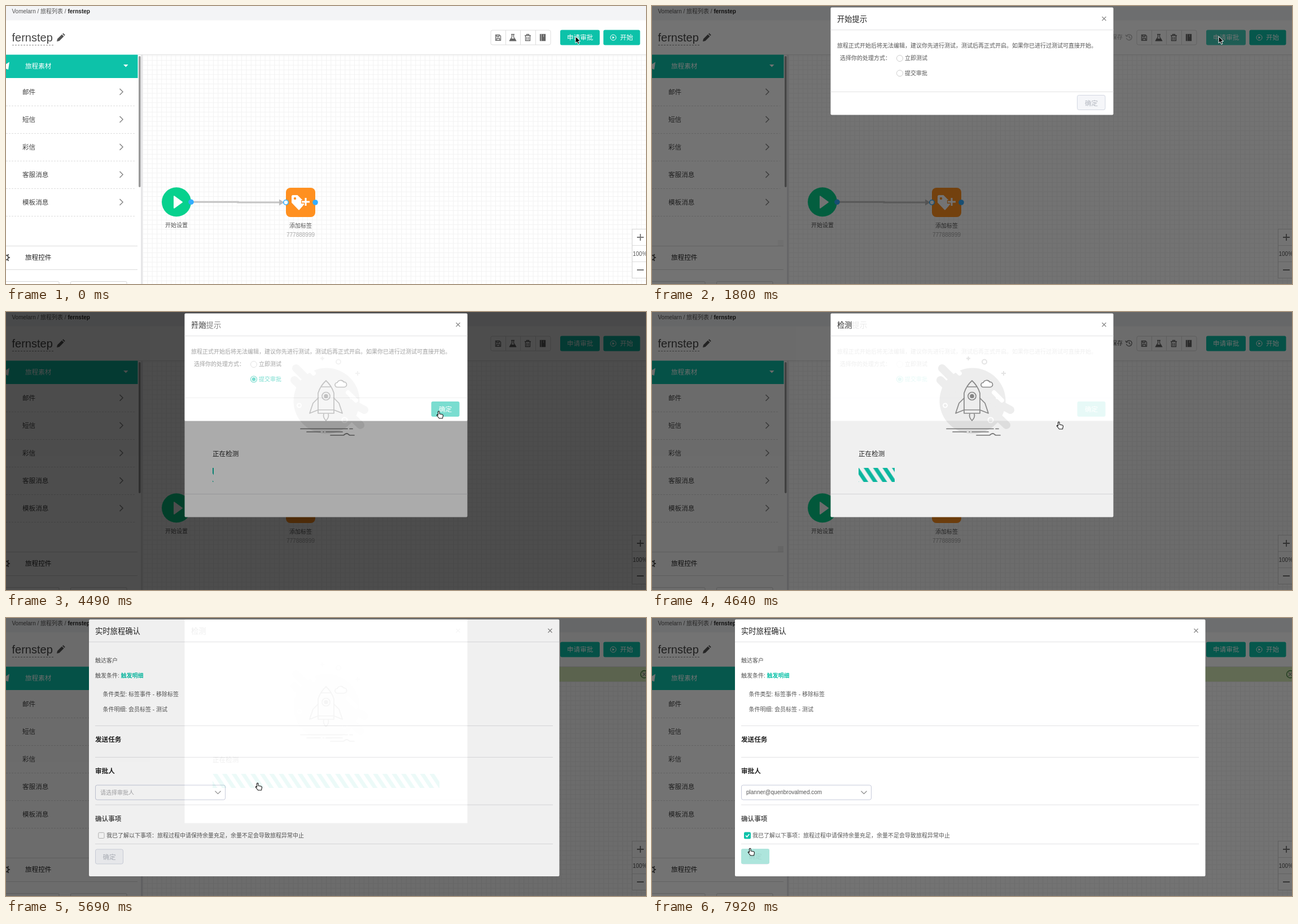
These frames come from a looping animation (1134 by 494 pixels, 8000 ms). An HTML page:

```html
<!DOCTYPE html>
<html lang="zh-CN">
<head>
<meta charset="utf-8">
<title>旅程</title>
<style>
html, body { margin: 0; width: 100%; height: 100%; overflow: hidden; background: #fff; }
svg { display: block; width: 100%; height: 100%; }
text { font: 10px "Liberation Sans", "Noto Sans CJK SC", "Noto Sans CJK", sans-serif; fill: #555; white-space: pre; }
.m { font-size: 11.6px; fill: #444; }
.b { font-weight: bold; fill: #222; }
.t { font-size: 13.3px; fill: #222; }
.w { font-size: 11.6px; font-weight: 500; fill: #fff; }
.dim { font-size: 11.6px; fill: #b4b8c0; }
.teal { fill: #0dc2a9; }
text.teal { font-weight: 500; }
.card { fill: #fff; }
.rule { stroke: #e2e2e4; fill: none; }
.off { fill: #f5f6f9; stroke: #d3d7e2; }
.line { fill: none; stroke: #7c7c7c; stroke-width: 1.7; stroke-linejoin: round; stroke-linecap: round; }
.x { stroke: #888; stroke-width: 1.2; fill: none; }

.a { animation: 8s step-end -10ms infinite; }
#veil { animation-name: veil; }
#apply { animation-name: apply; }
#saved { animation-name: saved; }
#ask { animation-name: ask; }
#askVeil { animation-name: askVeil; }
#picked { animation-name: picked; }
#check { animation-name: check; }
#checkVeil { animation-name: checkVeil; }
#bar { animation-name: bar; }
#slide { animation-name: slide; }
#confirm, #alert { animation-name: confirm; }
#list { animation-name: list; }
#hint { animation-name: hint; }
#mail { animation-name: mail; }
#agreed { animation-name: agreed; }
#ready { animation-name: ready; }
#pointer { animation-name: pointer; }
#arrow { animation-name: arrow; }
#hand { animation-name: hand; }

@keyframes veil { 0% { opacity: 0 } 22.5% { opacity: .55 } }
@keyframes apply { 0% { opacity: 1 } 18.75% { opacity: .78 } 24.375% { opacity: 1 } }
@keyframes saved { 0% { opacity: 0 } 22.5% { opacity: .5 } 24.375% { opacity: 1 } 56.125% { opacity: 0 } 58% { opacity: 1 } }
@keyframes ask { 0% { opacity: 0 } 22.5% { opacity: 1 } 56.125% { opacity: .55 } 58% { opacity: .1 } 59.875% { opacity: 0 } }
@keyframes askVeil { 0% { opacity: 0 } 56.125% { opacity: .33 } 58% { opacity: .06 } 59.875% { opacity: 0 } }
@keyframes picked { 0% { opacity: 0 } 41.125% { opacity: 1 } }
@keyframes check { 0% { opacity: 0 } 56.125% { opacity: 1 } 69.25% { opacity: .55 } 71.125% { opacity: .08 } 73% { opacity: 0 } }
@keyframes checkVeil { 0% { opacity: 0 } 69.25% { opacity: .33 } 71.125% { opacity: .06 } 73% { opacity: 0 } }
@keyframes bar {
  0% { width: 0 }
  56.125% { width: 2px; animation-timing-function: steps(6) }
  67.375% { width: 374px }
  69.25% { width: 402px }
}
@keyframes slide {
  0% { transform: none }
  56.125% { transform: translateX(0); animation-timing-function: steps(8) }
  71.125% { transform: translateX(-10px) }
}
@keyframes confirm { 0% { opacity: 0 } 69.25% { opacity: 1 } }
@keyframes list { 0% { opacity: 0 } 84% { opacity: .5 } 85.875% { opacity: 1 } 89.625% { opacity: .4 } 91.5% { opacity: 0 } }
@keyframes hint { 0% { opacity: 1 } 89.625% { opacity: 0 } }
@keyframes mail { 0% { opacity: 0 } 89.625% { opacity: 1 } }
@keyframes agreed { 0% { opacity: 0 } 97.125% { opacity: 1 } }
@keyframes ready { 0% { opacity: 0 } 99% { opacity: 1 } }
@keyframes arrow { 0% { opacity: 1 } 39.25% { opacity: 0 } 44.875% { opacity: 1 } 50.5% { opacity: 0 } }
@keyframes hand { 0% { opacity: 0 } 39.25% { opacity: 1 } 44.875% { opacity: 0 } 50.5% { opacity: 1 } }
@keyframes pointer {
  0% { transform: translate(1009px, 54px) }
  5.625% { transform: translate(1008px, 54px) }
  9.375% { transform: translate(1006px, 54px) }
  11.25% { transform: translate(1004px, 54px) }
  28% { transform: translate(985px, 57px) }
  29.875% { transform: translate(850px, 74px) }
  31.75% { transform: translate(650px, 98px) }
  33.625% { transform: translate(480px, 115px) }
  35.5% { transform: translate(386px, 122px) }
  37.375% { transform: translate(420px, 125px) }
  39.25% { transform: translate(436px, 125px) }
  44.875% { transform: translate(470px, 135px) }
  46.75% { transform: translate(560px, 155px) }
  48.625% { transform: translate(680px, 178px) }
  50.5% { transform: translate(758px, 185px) }
  52.375% { transform: translate(766px, 176px) }
  58% { transform: translate(720px, 195px) }
  59.875% { transform: translate(640px, 225px) }
  61.75% { transform: translate(560px, 255px) }
  63.625% { transform: translate(490px, 280px) }
  65.5% { transform: translate(452px, 291px) }
  67.375% { transform: translate(445px, 293px) }
  73% { transform: translate(430px, 297px) }
  74.875% { transform: translate(390px, 303px) }
  76.75% { transform: translate(330px, 308px) }
  78.625% { transform: translate(280px, 311px) }
  80.375% { transform: translate(255px, 312px) }
  82.25% { transform: translate(250px, 312px) }
  85.875% { transform: translate(250px, 318px) }
  87.75% { transform: translate(245px, 336px) }
  89.625% { transform: translate(240px, 340px) }
  91.5% { transform: translate(220px, 360px) }
  93.375% { transform: translate(185px, 380px) }
  95.25% { transform: translate(168px, 386px) }
  99% { transform: translate(173px, 409px) }
}
</style>
</head>
<body>
<svg viewBox="0 0 1134 494">
<defs>
  <pattern id="grid" x="242" y="88" width="8.333" height="8.333" patternUnits="userSpaceOnUse">
    <path d="M.5 0V8.333M0 .5H8.333" stroke="#f2f2f2"/>
  </pattern>
  <pattern id="stripes" x="366" y="277" width="16.7" height="25" patternUnits="userSpaceOnUse">
    <path class="teal" d="M-6.5 0h8.35l16.7 25h-8.35zM10.2 0h8.35l16.7 25h-8.35zM-23.2 0h8.35l16.7 25h-8.35z"/>
  </pattern>
  <clipPath id="done"><rect id="bar" class="a" x="366" y="277" height="25"/></clipPath>
  <path id="next" d="M-2.5-5.5 3 0l-5.5 5.5" fill="none" stroke="#888" stroke-width="1.5"/>
  <path id="close" class="x" d="M-3.5-3.5l7 7m0-7l-7 7"/>
</defs>

<!-- page -->
<rect width="1134" height="494" fill="#fff"/>
<rect width="1134" height="25.5" fill="#f3f4f6"/>
<text x="10.5" y="12.6" fill="#777">Vomelarn / 旅程列表 / <tspan class="b">fernstep</tspan></text>
<text x="10.5" y="63" style="font-size:20px;fill:#444">fernstep</text>
<path d="M11 69.5H84" stroke="#888" stroke-dasharray="3 2"/>
<path d="M90 63l1-4.5 8-8 3.5 3.5-8 8zM100 49.5l1.5-1.2 3.2 3.2-1.2 1.5z" fill="#555"/>

<rect x="241" y="87" width="893" height="407" fill="url(#grid)"/>
<path d="M234 86.5H1134" stroke="#e0e0e0"/>
<path d="M240.5 87V494" stroke="#e6e6e8" stroke-width="3"/>

<!-- toolbar -->
<rect x="859" y="43" width="106" height="26" rx="3" fill="#fff" stroke="#ddd"/>
<path d="M885.5 43v26M911.5 43v26M938.5 43v26" stroke="#ddd"/>
<g fill="none" stroke="#666" stroke-width="1.3">
  <path d="M867.5 51.5h7l2 2v7.5h-9zM869.5 51.5v3h4v-3M869.5 61v-3.5h5V61"/>
  <path d="M895 50.5h6M896.5 50.5v4.5l-4 6.5h11l-4-6.5v-4.5"/>
  <path d="M894.5 58.5h7l1.5 3h-10z" fill="#666"/>
  <path d="M919 52.5h11M922.5 52v-1.5h4V52"/>
  <path d="M920.5 53v8.5h8V53M923 55v5M926 55v5"/>
  <path d="M946.5 50.5h9v11h-9z" fill="#666"/>
  <path d="M948.5 50v12M952.5 51v4" stroke="#ddd" stroke-width=".7"/>
</g>
<g id="apply" class="a">
  <rect class="teal" x="982" y="42.5" width="70" height="27" rx="3"/>
  <text class="w" x="994" y="60.3">申请审批</text>
</g>
<rect class="teal" x="1058.5" y="42.5" width="65" height="27" rx="3"/>
<circle cx="1076" cy="56" r="5" fill="none" stroke="#fff"/>
<path d="M1074.5 53.7l3.8 2.3-3.8 2.3z" fill="#fff"/>
<text class="w" x="1088" y="60.3">开始</text>

<!-- sidebar -->
<rect y="87" width="233" height="407" fill="#fff"/>
<rect class="teal" y="86.5" width="233.5" height="41.5"/>
<path d="M-8 108L6 99.5 4 113l-5-2z" fill="#fff"/>
<text class="w" x="34" y="111.4">旅程素材</text>
<path d="M208 104h8.5l-4.2 4.5z" fill="#fff"/>
<text class="m" x="29" y="156.6">邮件</text><use href="#next" x="204" y="152.5"/>
<text class="m" x="29" y="205.7">短信</text><use href="#next" x="204" y="201.5"/>
<text class="m" x="29" y="254.8">彩信</text><use href="#next" x="204" y="250.5"/>
<text class="m" x="29" y="303.9">客服消息</text><use href="#next" x="204" y="299.5"/>
<text class="m" x="29" y="353">模板消息</text><use href="#next" x="204" y="348.5"/>
<path d="M0 177.5H228M0 226.5H228M0 275.5H228M0 324.5H228M0 373.5H228" stroke="#ddd" stroke-dasharray="3 2"/>
<path d="M0 426.5H233M0 468.5H233" stroke="#dcdcdc"/>
<circle cx="0" cy="447" r="4" fill="none" stroke="#555" stroke-width="2"/>
<path d="M4 447h3M2.5 443.5l2.2-2.2M2.5 450.5l2.2 2.2" stroke="#555" stroke-width="2"/>
<text class="w" x="34" y="451.4" style="fill:#222">旅程控件</text>
<path d="M0 489.5H92q2 0 2 2V494M114.5 494v-2.5q0-2 2-2H212q2 0 2 2V494" fill="none" stroke="#d5d5d5"/>
<rect x="235" y="89" width="3.5" height="233" rx="1.7" fill="#999"/>

<!-- flow -->
<path d="M332 348.3H411L411 349H486" fill="none" stroke="#c4c4c4" stroke-width="3"/>
<path d="M484 343.5l9 5.5-9 5.5z" fill="#bbb"/>
<circle cx="302" cy="348.3" r="26" fill="#07d18d"/>
<path d="M298 338.2v20.5l14-10.2z" fill="#fff" stroke="#fff" stroke-width="2" stroke-linejoin="round"/>
<rect x="496" y="323" width="52" height="52" rx="8" fill="#ff9020"/>
<path d="M508 337h8l13 13-10 11.5-12-12.5v-11z" fill="#fff" stroke="#fff" stroke-width="2" stroke-linejoin="round"/>
<circle cx="512" cy="342" r="2.2" fill="#ff9020"/>
<path d="M531 340v16M523 348h16" stroke="#ff9020" stroke-width="6"/>
<path d="M531 341v14M524 348h14" stroke="#fff" stroke-width="3"/>
<circle cx="328" cy="348.3" r="4.8" fill="#33adff"/>
<circle cx="548" cy="349" r="4.8" fill="#33adff"/>
<circle cx="496" cy="349" r="4.2" fill="#fff" stroke="#33adff" stroke-width="1.6"/>
<g text-anchor="middle">
  <text x="302" y="392.6">开始设置</text>
  <text x="522" y="393.6">添加标签</text>
  <text x="522" y="410" style="fill:#aaa">777888999</text>
</g>
<rect x="1109.5" y="396.5" width="30" height="87" fill="#fff" stroke="#d5d5d5"/>
<path d="M1110 425.5h24M1110 454.5h24" stroke="#ddd"/>
<path d="M1118 411h12M1124 405v12M1118 469h12" stroke="#777" stroke-width="1.8"/>
<text x="1110.5" y="443.5">100%</text>

<g id="saved" class="a">
  <path d="M223.5 129h9.5v297h-9.5z" fill="#fff"/>
  <path d="M223 416h10v10h-10z" fill="#f0f0f0"/>
  <text x="814" y="59.3" font-style="italic">保存</text>
  <path d="M841 53a5 5 0 1 1-.5 4M839 51l1.5 3 3-.5M845.5 52.5v3.5l2.5 1" fill="none" stroke="#666" stroke-width="1.2"/>
</g>
<g id="alert" class="a">
  <rect x="241" y="87" width="893" height="26" fill="#d9ecb8"/>
  <circle cx="1131" cy="100" r="6.5" fill="none" stroke="#3c7a3a" stroke-width="1.3"/>
  <use href="#close" x="1131" y="100"/>
</g>
<rect id="veil" class="a" width="1134" height="494"/>

<!-- confirm dialog -->
<g id="confirm" class="a">
  <rect class="card" x="147" y="2.5" width="833.5" height="456.5" rx="2"/>
  <text class="t" x="158" y="27.5">实时旅程确认</text>
  <use href="#close" x="964" y="22.5"/>
  <path class="rule" d="M147 42.5H980M158 191.5H969M158 247.5H969M158 332H969M158 401.5H969"/>
  <text x="158" y="79.3">触达客户</text>
  <text x="158" y="106">触发条件: <tspan class="teal" style="font-weight:bold">触发明细</tspan></text>
  <text x="171.5" y="139.2">条件类型: 标签事件 - 移除标签</text>
  <text x="171.5" y="166">条件明细: 会员标签 - 测试</text>
  <text class="m b" x="158" y="219.8">发送任务</text>
  <text class="m b" x="158" y="276.4">审批人</text>
  <rect x="158.5" y="297" width="230" height="26" rx="3" fill="#fff" stroke="#c6cada"/>
  <text id="hint" class="a" x="167" y="313.8" style="fill:#a5a5a8">请选择审批人</text>
  <text id="mail" class="a" x="167" y="313.3">planner@quenbrovalmed.com</text>
  <path class="x" d="M370.5 307.5l5 5 5-5"/>
  <text class="m b" x="158" y="361" style="fill:#555">确认事项</text>
  <rect x="163.8" y="381.3" width="10.2" height="10.2" rx="1.5" fill="#fff" stroke="#bbb"/>
  <g id="agreed" class="a">
    <rect class="teal" x="163" y="380.5" width="12" height="12" rx="2"/>
    <path d="M166 386.5l2.3 2.5 4-5" fill="none" stroke="#fff" stroke-width="1.6"/>
  </g>
  <text x="178" y="389.8">我已了解以下事项：旅程过程中请保持余量充足，余量不足会导致旅程异常中止</text>
  <rect class="off" x="158.5" y="411" width="49" height="26" rx="3"/>
  <text class="dim" x="171.5" y="428.5">确定</text>
  <g id="ready" class="a">
    <rect x="158" y="410" width="50" height="27" rx="3" fill="#ade5dc"/>
    <text class="dim" x="171.5" y="428" style="fill:#a0d6ce">确定</text>
  </g>
  <g id="list" class="a">
    <rect x="158.5" y="328" width="230" height="36" rx="3" fill="#fff" stroke="#dfe2ea"/>
    <rect x="159" y="333" width="229" height="26" fill="#f5f7fa"/>
    <text x="167" y="349.5">planner@quenbrovalmed.com</text>
  </g>
</g>

<!-- check dialog -->
<path id="checkVeil" class="a" fill-rule="evenodd" d="M0 0H1134V494H0zM316.5 2.5h501v362h-501z"/>
<g id="check" class="a">
  <rect class="card" x="316.5" y="2.5" width="501" height="362" rx="2"/>
  <text class="t" x="328" y="27.5">检测</text>
  <use href="#close" x="801" y="22.5"/>
  <path class="rule" d="M316.5 42.5h501M316.5 323.5h501"/>
  <circle cx="568" cy="158" r="58.5" fill="#ebebeb"/>
  <path d="M514 100l38 38M511 121l20 20M590 150l45 24M596 170l32 31" stroke="#ebebeb" stroke-width="14" stroke-linecap="round"/>
  <path d="M529 93l16 16M606 143l14 14" stroke="#fff" stroke-width="8" stroke-linecap="round"/>
  <g fill="none" stroke="#fff" stroke-width="2">
    <circle cx="519.5" cy="166" r="3.5"/><circle cx="600" cy="192" r="4.5"/><circle cx="612" cy="152" r="2"/>
  </g>
  <circle cx="589" cy="88.5" r="4" fill="none" stroke="#e2e2e2" stroke-width="2"/>
  <path d="M560.5 79v7M557 82.5h7M623 105v8M619 109h8" stroke="#e2e2e2" stroke-width="2"/>
  <g class="line">
    <path d="M567 122q-10 9-14 22v36h28v-36q-4-13-14-22zM559 133h16M553 174h28"/>
    <circle cx="567" cy="149.5" r="7"/><circle cx="567" cy="149.5" r="3" fill="#777"/>
    <path d="M553 153l-9 9-6 18 15-6M581 153l9 9 6 18-15-6M563 181q-2 6 4 12 6-6 4-12"/>
    <path d="M587 133.5a4 4 0 0 1 0-8 6.5 6.5 0 0 1 11.5-1 4.500 4.500 0 0 1 1 9z" fill="#fff"/>
    <path d="M522 207.5h83M609 207.5h5M533 213h24M562 213h1M567 213h29M575 219h22q2 0 3-1.5 4-3 7 0 1 1.5 3 1.5h7"/>
  </g>
  <text class="w" x="366" y="256.3" style="fill:#222">正在检测</text>
  <g clip-path="url(#done)">
    <rect id="slide" class="a" x="366" y="277" width="420" height="25" fill="url(#stripes)"/>
  </g>
</g>

<!-- start dialog -->
<path id="askVeil" class="a" fill-rule="evenodd" d="M0 0H1134V494H0zM316.5 2.5h501v191h-501z"/>
<g id="ask" class="a">
  <rect class="card" x="316.5" y="2.5" width="501" height="191" rx="2"/>
  <text class="t" x="328" y="27.5">开始提示</text>
  <use href="#close" x="801" y="22.5"/>
  <path class="rule" d="M316.5 42.5h501M316.5 152.5h501"/>
  <text x="328" y="74.3">旅程正式开始后将无法编辑，建议你先进行测试，测试后再正式开启。如果你已进行过测试可直接开始。</text>
  <text x="333" y="96.3">选择你的处理方式：</text>
  <g fill="#fff" stroke="#ccc"><circle cx="439" cy="93" r="5.5"/><circle cx="439" cy="119.5" r="5.5"/></g>
  <text x="448" y="96.3">立即测试</text>
  <text x="448" y="123">提交审批</text>
  <rect class="off" x="753.5" y="158.5" width="49.5" height="26" rx="3"/>
  <text class="dim" x="767" y="176.5">确定</text>
  <g id="picked" class="a">
    <path d="M447 112h44v15h-44z" fill="#fff"/>
    <circle cx="439" cy="119.5" r="5.5" fill="#fff" stroke="#0dc2a9" stroke-width="1.2"/>
    <circle class="teal" cx="439" cy="119.5" r="3.2"/>
    <text class="teal" x="448" y="123">提交审批</text>
    <rect x="753" y="158" width="51" height="28" fill="#fff"/>
    <rect class="teal" x="753.5" y="159" width="50" height="27" rx="3"/>
    <text class="w" x="767" y="176.8">确定</text>
  </g>
</g>

<g id="pointer" class="a">
  <path id="arrow" class="a" d="M0 0v12l2.800-2.600 2 4.600 2.200-1-2-4.400h3.800z" stroke="#fff"/>
  <path id="hand" class="a" d="M-.5 1q1.500-1.600 2.500.2V5l5 1q1.500.5 1.500 2.200L7.500 13H1.500l-4.300-5.500q.3-1.700 2.300 0z" fill="#fff" stroke="#111" stroke-width="1.1" stroke-linejoin="round"/>
</g>
</svg>
</body>
</html>
```
